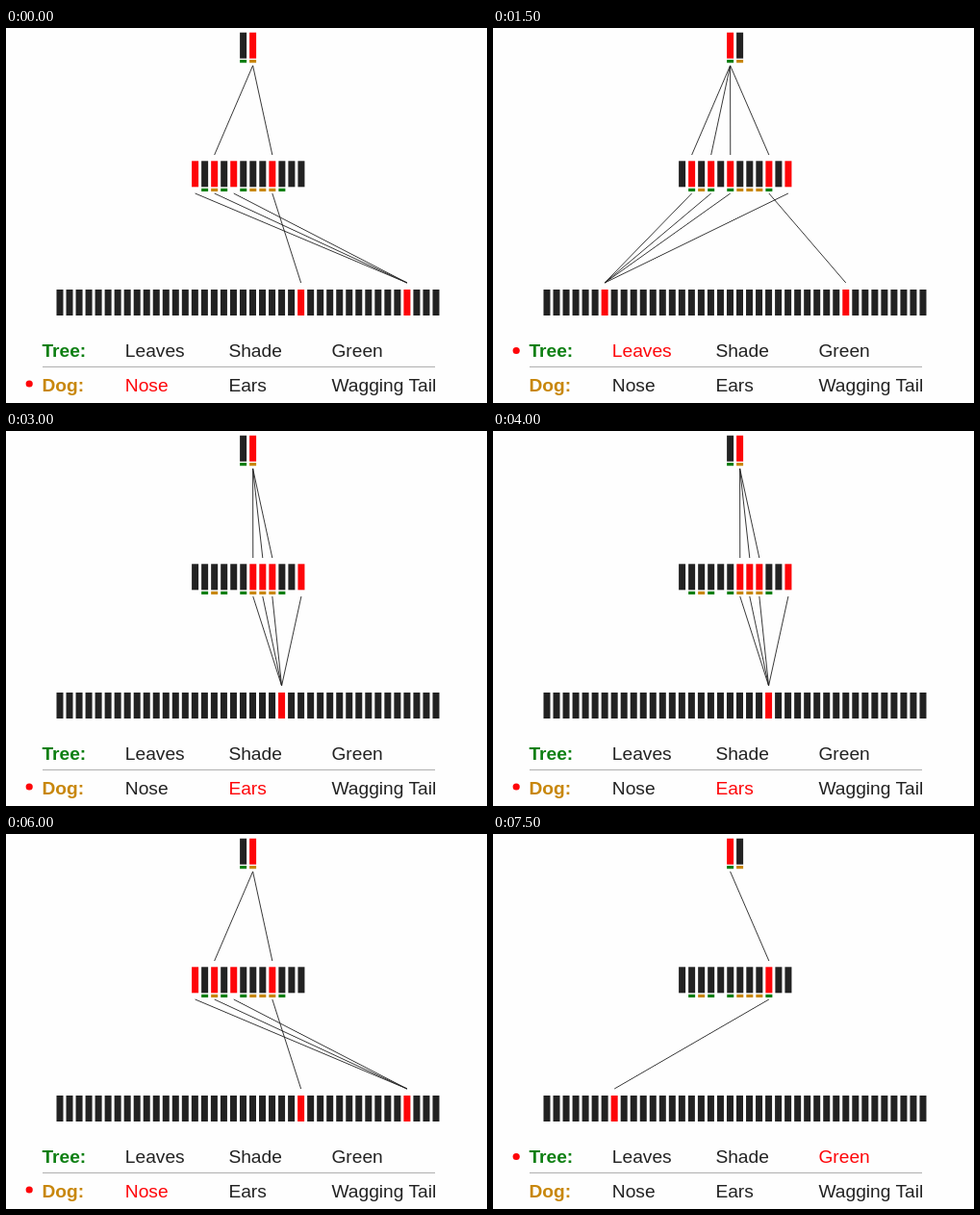
Recreate the animation shown at these times as an HTML page. Size 500 px wide and 390 px high, loop 8 s.

```html
<!DOCTYPE html>
<html lang="en">
<head>
<meta charset="utf-8">
<title>Sparse activations</title>
<style>
html, body { margin: 0; width: 100%; height: 100%; overflow: hidden; background: #fefefe; }
svg { display: block; }
text { font: 19.2px "Liberation Sans", Arial, sans-serif; }
.label { font-weight: bold; }
</style>
</head>
<body>
<svg id="stage" width="500" height="390" viewBox="0 0 500 390"></svg>
<script>
const RED = '#fe0509', DARK = '#222', GREEN = '#0d7f12', GOLD = '#c8870c';
const STEP = 500;
const COLUMNS = [123.8, 231.4, 338.4];

const classes = [
  { name: 'Tree:', color: GREEN, y: 342.4, dot: 335.5, middle: [1, 3, 5, 9], words: ['Leaves', 'Shade', 'Green'] },
  { name: 'Dog:', color: GOLD, y: 378.2, dot: 370, middle: [2, 6, 7, 8], words: ['Nose', 'Ears', 'Wagging Tail'] }
];

// links: [middle bar, bottom bar]; extra: bottom bars lit without a link
const features = {
  Leaves: { links: [[1, 6], [3, 6], [5, 6], [11, 6], [9, 31]] },
  Shade: { links: [[1, 0], [3, 0]] },
  Green: { links: [[9, 7]] },
  Nose: { links: [[0, 36], [2, 36], [4, 36], [8, 25]] },
  Ears: { links: [[6, 23], [7, 23], [8, 23], [11, 23]] },
  'Wagging Tail': { links: [[6, 16], [7, 28]], extra: [37] }
};

const sequence = ['Nose', 'Leaves', 'Green', 'Leaves', 'Shade', 'Leaves', 'Ears', 'Wagging Tail',
  'Ears', 'Nose', 'Wagging Tail', 'Ears', 'Nose', 'Wagging Tail', 'Shade', 'Green'];

const topX = i => 246.6 + 10 * i;
const middleX = i => 196.6 + 10.03 * i;
const bottomX = i => 56 + 10.025 * i;

const rect = (x, y, h, color) =>
  `<rect x="${x - 3.5}" y="${y}" width="7" height="${h}" fill="${color}"/>`;
const line = (x1, y1, x2, y2, color = DARK, width = 0.9) =>
  `<line x1="${x1}" y1="${y1}" x2="${x2}" y2="${y2}" stroke="${color}" stroke-width="${width}"/>`;
const text = (x, y, s, color, kind = '') =>
  `<text x="${x}" y="${y}" fill="${color}" class="${kind}">${s}</text>`;

function row(count, place, y, lit) {
  let out = '';
  for (let i = 0; i < count; i++) out += rect(place(i), y, 27, lit.includes(i) ? RED : DARK);
  return out;
}

function draw(word) {
  const { links, extra = [] } = features[word];
  const active = classes.findIndex(c => c.words.includes(word));
  const middle = links.map(l => l[0]);
  const bottom = links.map(l => l[1]).concat(extra);

  let out = row(2, topX, 4.7, [active])
    + row(12, middleX, 138.3, middle)
    + row(40, bottomX, 272, bottom)
    + line(38, 352.4, 446, 352.4, '#aaa', 1);

  classes.forEach((c, i) => {
    out += rect(topX(i), 33, 3.2, c.color);
    for (const m of c.middle) out += rect(middleX(m), 166.8, 3.2, c.color);
    out += text(37.4, c.y, c.name, c.color, 'label');
    c.words.forEach((w, k) => out += text(COLUMNS[k], c.y, w, w === word ? RED : DARK));
  });

  const { middle: watched, dot } = classes[active];
  for (const [m, b] of links) {
    out += line(middleX(m), 172, bottomX(b), 265);
    if (watched.includes(m)) out += line(topX(active), 39, middleX(m), 132);
  }
  return out + `<circle cx="24.2" cy="${dot}" r="3.6" fill="${RED}"/>`;
}

const stage = document.getElementById('stage');
let shown = -1;
function tick() {
  const step = Math.floor(performance.now() / STEP) % sequence.length;
  if (step !== shown) {
    shown = step;
    stage.innerHTML = draw(sequence[step]);
  }
  requestAnimationFrame(tick);
}
tick();
</script>
</body>
</html>
```
